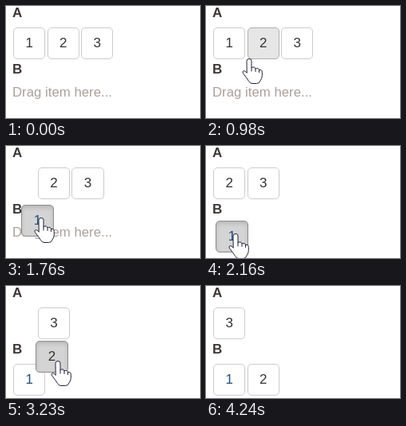
Animation of 243 by 141 pixels, one loop 4790 ms. Source, as an HTML page:

```html
<!DOCTYPE html>
<html lang="en">
<head>
<meta charset="utf-8">
<title>Drag between lists</title>
<style>
  html, body { margin: 0; width: 100%; height: 100%; overflow: hidden; background: #fff; }
  body { position: relative; font: 17px/19px "Liberation Sans", Arial, sans-serif; color: #333; }
  body > * { position: absolute; left: 0; top: 0; white-space: nowrap; }
  .text { left: 8px; }
  b { color: #3c3836; }
  #hint { top: 99px; font-size: 16.8px; color: #aba099; }
  .item {
    box-sizing: border-box; width: 40.45px; height: 40px; line-height: 38px; text-align: center;
    background: #fff; border: 1px solid #ccc; border-radius: 5px;
  }
  .hover { background: #e6e6e6; border-color: #adadad; }
  .active {
    width: 41px; background: #d4d4d4; border-color: #8c8c8c; z-index: 1;
    box-shadow: inset 0 3px 5px rgba(0, 0, 0, .125);
  }
  #first.moved { color: #1f4e80; }
  #hand { z-index: 2; overflow: visible; }
</style>
</head>
<body>
<b class="text" style="top:-1px">A</b>
<b class="text" style="top:70px">B</b>
<div class="text" id="hint">Drag item here...</div>
<div class="item" id="first">1</div>
<div class="item">2</div>
<div class="item">3</div>
<svg id="hand" width="1" height="1" stroke="#20203a" stroke-linejoin="round" stroke-linecap="round">
  <path fill="#fff" d="M-3 3Q-3 .5 0 .5Q3 .5 3 3V11.5Q7 9.8 8 13Q11.5 11.4 12.5 14.5Q16.3 13.6 16.3 17.5V21.5Q16.3 25 14 28Q13 31.5 9.5 31.5H4Q1 31.5 -.5 28.5Q-3 24.5 -7 19.5Q-9 16.5 -6.8 15.6Q-4.8 15.2 -3 18Z"/>
  <path fill="none" d="M3 11.5V16M8 13V16.5M12.5 14.5V17.5"/>
</svg>
<script>
const LOOP = 4790;
const FIRST_TICK = 670, TICK = 77.4;   // all motion advances in ticks of this many ms
const EXIT = 46;
const LEFT = 9, ROW_A = 27, ROW_B = 98, SIZE = 40, SLOT = 42.5;
const LIFT_SHIFT = 11.7;               // how far neighbours close up when an item is lifted

const linear = k => k;
const easeOut = k => 1 - (1 - k) ** 2;
const easeInOut = k => k * k * (3 - 2 * k);

// Pointer strokes in ticks; the pointer rests between them
const entry = [114, 135];
const moves = [
  { from: 0, until: 8, to: [34, 43], ease: easeOut },
  { from: 10, until: 16, to: [47, 107], ease: easeInOut },
  { from: 16, until: 19, to: [37, 110], ease: easeOut },
  { from: 22, until: 27, to: [37, 52], ease: easeInOut },
  { from: 28, until: 33, to: [65, 94], ease: linear },
  { from: 33, until: 37, to: [76, 119], ease: easeOut },
  { from: 37, until: 39, to: [78, 120], ease: linear },
  { from: 41, until: 45, to: [145, 136], ease: linear }
];

// One drag for each of the first two items, in ticks
const drags = [
  { press: 10, lift: 11, cross: 15, drop: 22 },
  { press: 28, lift: 29, cross: 34, drop: 37 }
];

const items = [...document.querySelectorAll(".item")];
const hand = document.getElementById("hand");
const hint = document.getElementById("hint");

function pointerAt(tick) {
  let position = entry;
  for (const { from, until, to, ease } of moves) {
    if (tick < from) break;
    const k = ease(Math.min(1, (tick - from) / (until - from)));
    position = position.map((value, axis) => value + (to[axis] - value) * k);
  }
  return position.map(Math.round);
}

function positionInA(index, tick) {
  let x = LEFT + SLOT * index;
  for (const { lift, cross } of drags.slice(0, index)) {
    x -= tick >= cross ? SLOT : tick >= lift ? LIFT_SHIFT : 0;
  }
  return [x, ROW_A];
}

function itemPosition(index, tick) {
  const drag = drags[index];
  if (!drag || tick < drag.press) return positionInA(index, tick);
  if (tick >= drag.drop) return [LEFT + SLOT * index, ROW_B];
  const grabbed = pointerAt(drag.press), now = pointerAt(tick);
  return positionInA(index, drag.press).map((value, axis) => value + now[axis] - grabbed[axis]);
}

function place(element, [x, y]) {
  element.style.left = x + "px";
  element.style.top = y + "px";
}

function draw(tick) {
  const pointer = pointerAt(tick);
  const visible = tick >= 0 && tick < EXIT;
  const dragged = drags.findIndex(d => tick >= d.press && tick < d.drop);

  items.forEach((item, index) => {
    const position = itemPosition(index, tick);
    const over = pointer.every((p, axis) => p >= position[axis] && p < position[axis] + SIZE);
    place(item, position);
    item.classList.toggle("moved", tick >= drags[index]?.press);
    item.classList.toggle("active", index === dragged);
    item.classList.toggle("hover", visible && dragged < 0 && over);
  });
  hint.style.visibility = tick < drags[0].cross ? "visible" : "hidden";
  hand.style.visibility = visible ? "visible" : "hidden";
  place(hand, pointer);
}

const start = performance.now();
function frame() {
  const time = (performance.now() - start) % LOOP;
  draw(Math.floor((time - FIRST_TICK) / TICK));
  requestAnimationFrame(frame);
}
frame();
</script>
</body>
</html>
```
